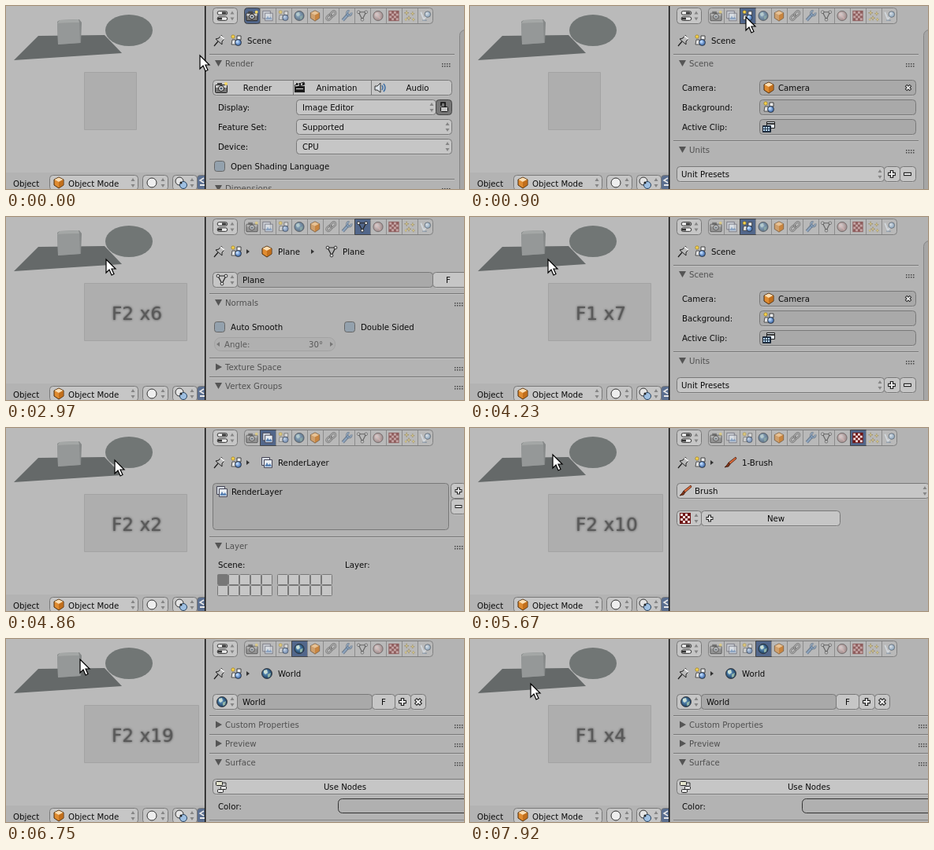
An HTML page with a canvas that plays this animation: 581 by 233 pixels, repeating every 8 s.

```html
<!DOCTYPE html>
<html lang="en">
<head>
<meta charset="utf-8">
<title>Properties tabs</title>
<style>
html, body { margin: 0; width: 100%; height: 100%; overflow: hidden; background: #b3b3b3; }
canvas { display: block; }
</style>
</head>
<body>
<canvas id="stage" width="581" height="233"></canvas>
<script>
const c = document.getElementById('stage').getContext('2d');
const LOOP = 8000, TICK = 90, FONT = '"DejaVu Sans", sans-serif';
const TABS = ['camera', 'layers', 'scene', 'world', 'cube', 'chain',
  'wrench', 'mesh', 'material', 'checker', 'spark', 'physics'];

// ---------- basic shapes ----------
function poly(pts, fill, stroke, w = 1) {
  c.beginPath();
  for (let i = 0; i < pts.length; i += 2) c.lineTo(pts[i], pts[i + 1]);
  if (fill) { c.closePath(); c.fillStyle = fill; c.fill(); }
  if (stroke) { c.strokeStyle = stroke; c.lineWidth = w; c.stroke(); }
}
function disc(x, y, r, fill, stroke, w = 1) {
  c.beginPath();
  c.arc(x, y, r, 0, 7);
  if (fill) { c.fillStyle = fill; c.fill(); }
  if (stroke) { c.strokeStyle = stroke; c.lineWidth = w; c.stroke(); }
}
function rect(x, y, w, h, fill) {
  c.fillStyle = fill;
  c.fillRect(x, y, w, h);
}
function box(x, y, w, h, fill, r = 4, stroke = '#787878') {
  c.beginPath();
  c.roundRect(x + .5, y + .5, w - 1, h - 1, r);
  c.fillStyle = fill;
  c.fill();
  c.strokeStyle = stroke;
  c.lineWidth = 1;
  c.stroke();
}
function text(s, x, y, color = '#0c0c0c', align = 'left') {
  c.font = '10.2px ' + FONT;
  c.textAlign = align;
  c.fillStyle = color;
  c.fillText(s, x, y + 4);
}
function ball(x, y, r, light, dark) {
  const g = c.createRadialGradient(x - r / 3, y - r / 3, 1, x, y, r);
  g.addColorStop(0, light);
  g.addColorStop(1, dark);
  disc(x, y, r, g, '#333', .8);
}

// ---------- icons, drawn around 0,0 ----------
const ICONS = {
  camera() {
    box(-8, -4, 16, 11, '#777', 1, '#222');
    rect(-7, -3, 14, 3, '#ccc');
    rect(-5, -6, 6, 3, '#444');
    disc(0, 1, 3.5, '#ddd', '#111');
    disc(0, 1, 1.6, '#456');
    disc(6, -5, 2, '#f5d765');
  },
  layers() {
    box(-7, -7, 11, 11, '#d7dde5', 0, '#445');
    box(-4, -4, 11, 11, '#e8edf2', 0, '#445');
    poly([-3, 5, 0, 0, 2, 3, 4, 1, 6, 5], '#5b83b4');
  },
  scene() {
    poly([-5, -1, -1, -1, 0, 5, -6, 5], '#e6e6e6', '#333', .8);
    poly([1, -6, 6, -6, 6, -1, 1, -1], '#eee', '#333', .9);
    ball(2.5, 2.5, 4, '#b9d8ff', '#2c5a9c');
    disc(-4, -5, 2.2, '#f5d24e', '#8a6d18', .6);
  },
  world() {
    ball(0, 0, 6.5, '#6fa6d2', '#173a5e');
    poly([-4, -4, 0, -5, 1, -1, -2, 1, -4, -1], '#e2efd8cc');
    poly([1, 1, 5, -1, 4, 4, 1, 5], '#a9cbb0cc');
  },
  cube() {
    poly([0, -7, 6, -4, 6, 3, 0, 7, -6, 3, -6, -4], '#e08c31', '#4b2b0b');
    poly([0, -6.5, 5.5, -4, 0, -1, -5.5, -4], '#fbdfb6');
    poly([0, -1, 5.5, -4, 5.5, 3, 0, 6.3], '#c26f1c');
  },
  chain() {
    c.save();
    c.rotate(-.75);
    for (const x of [-7, 0]) {
      c.beginPath();
      c.roundRect(x, -2.5, 8, 5, 2.5);
      c.strokeStyle = '#444'; c.lineWidth = 2.6; c.stroke();
      c.strokeStyle = '#ddd'; c.lineWidth = 1.1; c.stroke();
    }
    c.restore();
  },
  wrench() {
    poly([-5, 6, 3, -3], null, '#28415e', 4.2);
    poly([-5, 6, 3, -3], null, '#a9c9ea', 2.4);
    c.beginPath();
    c.arc(3.5, -3.5, 3, -.2, 4.8);
    c.strokeStyle = '#28415e'; c.lineWidth = 2.8; c.stroke();
    c.strokeStyle = '#c1d9f0'; c.lineWidth = 1.4; c.stroke();
  },
  mesh() {
    poly([-5, -5, 5, -5, 0, 5, -5, -5], null, '#222', 1.2);
    for (const [x, y] of [[-5, -5], [5, -5], [0, 5]]) disc(x, y, 1.9, '#eee', '#222', .9);
  },
  material() {
    ball(0, 0, 6.5, '#eadfdf', '#8b6262');
    poly([-4, -4, 3, 4], null, '#d9b4b4', 2);
  },
  checker() {
    rect(-7, -7, 14, 14, '#6e1515');
    for (let i = 0; i < 16; i++)
      if ((i + (i >> 2)) % 2 == 0) rect(-6 + i % 4 * 3, -6 + (i >> 2) * 3, 3, 3, '#f3dede');
  },
  spark() {
    for (const [x, y, r] of [[-4, -4, 3], [4, -3, 2.5], [-1, 3, 3], [5, 5, 2], [-5, 5, 1.5]]) {
      poly([x - r, y, x + r, y], null, '#8b7430', 1.4);
      poly([x, y - r, x, y + r], null, '#8b7430', 1.4);
      disc(x, y, 1.2, '#fff0a8');
    }
  },
  physics() {
    poly([-6, -5, -2, 5, 1, 0], null, '#e8f1fa', 2);
    ball(3, -2, 4, '#e2f1ff', '#608fbc');
    poly([-4, 6, 2, 6], null, '#5f7890', 1.4);
  },
  brush() {
    poly([6, -7, 7, -5, -1, 2, -3, 0], '#dc6a3a', '#4a2010', .8);
    poly([-3, 0, -1, 2, -3, 5, -8, 6, -5, 3], '#7d3318', '#401c10', .8);
  },
  clip() {
    box(-3, -7, 11, 9, '#e4ebf2', 0, '#222');
    rect(-2, -5, 9, 2, '#333');
    box(-8, -2, 11, 9, '#24364d', 0, '#16222f');
    for (let i = 0; i < 6; i++) rect(-7 + i % 3 * 3, (i / 3 | 0) * 3, 2, 2, '#b8d8f2');
  },
  slate() {
    rect(-7, -2, 13, 8, '#1d1d1d');
    poly([-7, -3, 5, -7, 6, -4, -6, -1], '#eee', '#222');
    for (const x of [-4, 0, 4]) rect(x - 1, -6, 2, 3, '#222');
    rect(-5, 1, 9, 1, '#ddd');
  },
  speaker() {
    poly([-6, -2, -3, -2, 1, -6, 1, 6, -3, 3, -6, 3], '#dce2e8', '#333');
    for (const r of [4, 7]) {
      c.beginPath(); c.arc(0, 0, r, -.8, .8);
      c.strokeStyle = '#3c6ea5'; c.lineWidth = 1.5; c.stroke();
    }
  },
  nodes() {
    box(-7, -7, 9, 6, '#e6e6cf', 1, '#222');
    box(-1, -1, 8, 5, '#e6e6e6', 1, '#222');
    box(-5, 3, 8, 5, '#e6e6e6', 1, '#222');
    poly([2, -5, 6, -5, 6, -1], null, '#333');
  },
  pin() {
    poly([-7, 7, -2, 1], null, '#222', 1.3);
    poly([-5, -2, 3, 5, 3, 1, 6, -2, 2, -7, -1, -3], '#bbb', '#222');
    poly([1, -6, 6, -2], null, '#eee', 2);
  },
  lock() {
    box(-5, -1, 10, 7, '#c5c5c5', 1, '#111');
    poly([-4, -2, -4, -6, 1, -6, 1, -1], null, '#111', 1.6);
  },
  props() {
    for (const [y, x] of [[-7, 0], [1, -6]]) {
      box(-7, y, 15, 6, '#eee', 3, '#222');
      rect(x, y + 1.5, 6, 3, '#333');
    }
  },
  plus() {
    poly([-5, 0, 5, 0], null, '#222', 4.4); poly([0, -5, 0, 5], null, '#222', 4.4);
    poly([-4, 0, 4, 0], null, '#eee', 2); poly([0, -4, 0, 4], null, '#eee', 2);
  },
  minus() {
    poly([-5, 0, 5, 0], null, '#222', 4.4);
    poly([-4, 0, 4, 0], null, '#eee', 2);
  },
  cross() {
    c.save(); c.rotate(Math.PI / 4); ICONS.plus(); c.restore();
  }
};
function icon(name, x, y, k = 1) {
  c.save();
  c.translate(x, y);
  c.scale(k, k);
  ICONS[name]();
  c.restore();
}

// ---------- widgets ----------
const LIGHT = '#c6c6c6', SUNK = '#a9a9a9';
function updown(x, y) {
  poly([x - 2.5, y - 2, x + 2.5, y - 2, x, y - 6], '#858585');
  poly([x - 2.5, y + 2, x + 2.5, y + 2, x, y + 6], '#858585');
}
// A row-high widget with a faint light rim below it.
function row(x, y, w, fill) {
  const top = Math.floor(y - 9.5);
  rect(x + 4, top + 20, w - 8, 1, '#c0c0c0');
  box(x, top, w, 20, fill);
}
function button(x, y, w, label, mid = x + w / 2) {
  row(x, y, w, LIGHT);
  if (label) text(label, mid, y, undefined, 'center');
}
function menu(x, y, w, label, dx = 8) {
  button(x, y, w);
  text(label, x + dx, y);
  updown(x + w - 6, y);
}
function field(x, y, w, label = '', dx = 24) {
  row(x, y, w, SUNK);
  text(label, x + dx, y);
}
function check(x, y, label) {
  box(x, y - 7, 14, 14, '#93a1ad', 3, '#666');
  text(label, x + 21, y);
}
function panel(y, label, open = true, right = 569) {
  rect(258, y - 12, right - 258, 1, '#777');
  rect(258, y - 11, right - 258, 1, '#c3c3c3');
  poly(open ? [265, y - 4, 274, y - 4, 269.5, y + 4] : [266, y - 4.5, 274, y, 266, y + 4.5], '#555');
  text(label, 278, y, '#505050');
  for (let i = 0; i < 8; i++) rect(right - 16 + (i % 4) * 3, y + (i > 3 ? 3 : 0), 1.5, 1.5, '#444');
}
function crumbs(...items) {
  icon('pin', 271, 44);
  icon('scene', 292, 44);
  if (!items.length) return text('Scene', 306, 44);
  let x = 331;
  for (const [name, label] of items) {
    poly([x - 26, 41, x - 22, 44, x - 26, 47], '#333');
    icon(name, x, 44);
    text(label, x + 14, 44);
    x += 82;
  }
}
function nameRow(name, label, w) {
  button(262, 80, 32);
  icon(name, 274, 80);
  updown(287, 80);
  field(293, 80, w, label, 7);
  button(292 + w, 80, w > 200 ? 60 : 30, 'F', w > 200 ? 561 : 479);
}
function scrollbar() {
  box(575, 30, 20, 230, '#a6a6a6', 7, '#858585');
}
function slots() {
  box(262, 70, 300, 60, SUNK);
  for (const [name, y] of [['plus', 80], ['minus', 100]]) {
    button(564, y, 20);
    icon(name, 574, y, .9);
  }
}

// ---------- one page per tab ----------
const plane = ['cube', 'Plane'];
const PAGES = {
  camera() {
    scrollbar(); crumbs(); panel(73, 'Render');
    button(262, 104, 304);
    rect(364, 95, 1, 18, '#787878'); rect(463, 95, 1, 18, '#787878');
    icon('camera', 273, 104); icon('slate', 373, 104); icon('speaker', 474, 104);
    text('Render', 319, 104, '#0c0c0c', 'center');
    text('Animation', 419.5, 104, '#0c0c0c', 'center');
    text('Audio', 522, 104, '#0c0c0c', 'center');
    [['Display:', 'Image Editor', 178], ['Feature Set:', 'Supported', 198], ['Device:', 'CPU', 198]]
      .forEach(([a, b, w], i) => { text(a, 269, 129 + i * 25); menu(368, 129 + i * 25, w, b); });
    box(545, 119, 21, 20, '#777', 4, '#444');
    icon('lock', 556, 129);
    check(264, 204, 'Open Shading Language');
    panel(232, 'Dimensions');
  },
  layers() {
    crumbs(['layers', 'RenderLayer']);
    slots();
    icon('layers', 274, 81); text('RenderLayer', 286, 81);
    panel(150, 'Layer', true, 585);
    text('Scene:', 269, 174); text('Layer:', 430, 174);
    for (let i = 0; i < 20; i++)
      box(268 + i % 10 * 14 + (i % 10 > 4 ? 6 : 0), 186 + (i > 9 ? 14 : 0), 14, 14, i ? LIGHT : '#777', 1);
  },
  scene() {
    scrollbar(); crumbs(); panel(73, 'Scene');
    [['Camera:', 'Camera', 'cube'], ['Background:', '', 'scene'], ['Active Clip:', '', 'clip']]
      .forEach(([a, b, name], i) => {
        const y = 104 + i * 25;
        text(a, 269, y); field(367, y, 199, b); icon(name, 379, y);
      });
    icon('cross', 556, 104, .85);
    panel(183, 'Units');
    menu(262, 214, 264, 'Unit Presets', 6);
    button(525, 214, 21); icon('plus', 535, 214);
    button(545, 214, 21); icon('minus', 555, 214);
  },
  world() {
    crumbs(['world', 'World']);
    nameRow('world', 'World', 172);
    button(493, 80, 21); icon('plus', 503, 80);
    button(513, 80, 20); icon('cross', 523, 80);
    panel(109, 'Custom Properties', false, 585);
    panel(133, 'Preview', false, 585);
    panel(157, 'Surface', true, 585);
    button(262, 188, 336, 'Use Nodes');
    icon('nodes', 273, 188);
    text('Color:', 269, 213);
    box(421, 203, 180, 19, '#b0b0b0', 5, '#333');
    rect(258, 230, 323, 1, '#858585');
  },
  cube() {
    crumbs(plane);
    nameRow('cube', 'Plane', 249);
    panel(109, 'Transform', true, 585);
    ['Location:', 'Rotation:', 'Scale:'].forEach((s, i) => {
      const x = 264 + i * 108;
      text(s, x + 4, 133);
      for (let j = 0; j < 3; j++) {
        field(x, 153 + j * 20, 104, 'XYZ'[j] + ':', 14);
        text(i == 1 ? '0°' : i ? '1.000' : '0.000', x + 92, 153 + j * 20, '#111', 'right');
      }
    });
    panel(226, 'Delta Transform', false, 585);
  },
  chain() {
    crumbs(plane);
    menu(262, 80, 320, 'Add Object Constraint');
  },
  wrench() {
    crumbs(plane);
    menu(262, 80, 320, 'Add Modifier');
  },
  mesh() {
    crumbs(plane, ['mesh', 'Plane']);
    nameRow('mesh', 'Plane', 249);
    panel(109, 'Normals', true, 585);
    check(264, 140, 'Auto Smooth');
    check(429, 140, 'Double Sided');
    box(264, 153, 154, 18, '#b0b0b0', 8, '#a3a3a3');
    text('Angle:', 277, 162, '#595959');
    text('30°', 402, 162, '#595959', 'right');
    poly([271, 159, 267, 162, 271, 165], '#777');
    poly([411, 159, 415, 162, 411, 165], '#777');
    panel(191, 'Texture Space', false, 585);
    panel(215, 'Vertex Groups', true, 585);
  },
  material() {
    crumbs(plane);
    slots();
    button(262, 147, 32); icon('material', 274, 147); updown(287, 147);
    button(293, 147, 270, 'New'); icon('plus', 304, 147);
  },
  checker() {
    crumbs(['brush', '1-Brush']);
    menu(262, 80, 321, 'Brush', 23);
    icon('brush', 274, 80);
    button(262, 115, 32); icon('checker', 273, 115); updown(287, 115);
    button(293, 115, 177, 'New', 388); icon('plus', 304, 115, .9);
  },
  spark() {
    crumbs(plane);
    slots();
    button(262, 147, 300, 'New'); icon('plus', 273, 147);
  },
  physics() {
    crumbs(plane);
    text('Enable physics for:', 264, 73);
    ['Force Field', 'Collision', 'Cloth', 'Dynamic Paint', 'Soft Body', 'Fluid', 'Smoke', 'Rigid Body']
      .forEach((s, i) => button(i < 4 ? 262 : 424, 94 + i % 4 * 22, 158, s));
  }
};

// ---------- viewport ----------
function viewport() {
  rect(0, 0, 252, 233, '#bababa');
  poly([41, 38, 125, 37, 147, 60, 10, 69], '#656969');
  poly([65, 20, 68, 18, 93, 17, 96, 21, 95, 47, 66, 49], '#868989');
  poly([65, 22, 93, 21, 94, 47, 66, 49], '#959898');
  poly([65, 22, 68, 18, 92, 17, 93, 21], '#a4a7a6');
  c.beginPath();
  c.ellipse(156, 31, 30, 20, 0, 0, 7);
  c.fillStyle = '#717675';
  c.fill();

  rect(0, 212, 252, 21, '#b3b3b3');
  text('Object', 9, 226);
  button(55, 225, 113); icon('cube', 67, 225); text('Object Mode', 79, 226); updown(161, 225);
  button(173, 225, 33); disc(185, 225, 6, '#eee', '#333'); updown(199, 225);
  button(211, 225, 32);
  disc(220, 223, 5, '#e5e5e5', '#333'); disc(225, 228, 4.5, '#9fc0e2', '#27425f');
  disc(222, 225, 1.5, '#222'); updown(236, 225);
  box(242, 215, 20, 20, '#5b6f90');
  poly([251, 219, 246, 222, 251, 225], null, '#e8e8e8', 1.5);
  poly([246, 228, 252, 228], null, '#e8e8e8', 2);
}
function keyBox(label) {
  c.font = '23.2px ' + FONT;
  c.textAlign = 'left';
  const w = label ? c.measureText(label).width : 0;
  box(99, 84, Math.round(w + 67), 74, '#aeaeae', 0, '#a3a3a3');
  if (!label) return;
  c.save();
  c.shadowColor = '#444';
  c.shadowBlur = 3;
  c.fillStyle = '#5a5a5a';
  c.fillText(label, 134, 131);
  c.restore();
}
function header(tab) {
  box(262, 2, 32, 21, LIGHT);
  icon('props', 274, 12.5, .9);
  updown(287, 12.5);
  box(302, 2, 240, 21, '#b9b9b9', 4, '#808080');
  TABS.forEach((name, i) => {
    const x = 302 + i * 20;
    if (i == tab) box(x, 2, 21, 21, '#52678b', i ? 0 : 4, '#444');
    else if (i) rect(x, 3, 1, 19, '#8c8c8c');
    c.globalAlpha = i == tab ? 1 : .55;
    icon(name, x + 10, 12.5, .95);
    c.globalAlpha = 1;
  });
}

// ---------- timeline ----------
// start, interval, key, presses, direction, first tab, presses already counted
const RUNS = [
  [1980, 198, 'F2', 8, 1, 1, 0],
  [3510, 120, 'F1', 10, -1, 9, 0],
  [4680, 110, 'F2', 10, 1, 11, 0],
  [5790, 120, 'F2', 13, 1, 9, 10],
  [7410, 160, 'F1', 4, -1, 7, 0]
];
function stateAt(t) {
  let tab = t < 540 ? 0 : t < 720 ? 1 : t < 1350 ? 2 : 1, label = '';
  for (const [start, gap, key, n, dir, from, base] of RUNS) {
    if (t < start) break;
    const k = Math.min(n, Math.floor((t - start) / gap) + 1);
    const moved = base ? Math.min(k, Math.max(2, k - 3)) : k;
    tab = (from + dir * moved + 12) % 12;
    label = key + (k + base > 1 ? ' x' + (k + base) : '');
  }
  return { tab, label };
}
const PATH = [
  [0, 246, 63], [450, 312, 16], [810, 350, 14], [1170, 350, 14], [1350, 331, 14],
  [1530, 312, 18], [2070, 127, 54], [2970, 127, 54], [3690, 120, 52], [4050, 84, 50],
  [4230, 99, 54], [4500, 122, 50], [4950, 140, 40], [5310, 118, 36], [5490, 76, 36],
  [5670, 105, 34], [6120, 84, 32], [6390, 68, 30], [6750, 94, 26], [6930, 128, 36],
  [7290, 148, 45], [7740, 128, 54], [7920, 77, 57]
];
function pointerAt(t) {
  const i = PATH.findIndex(p => p[0] > t);
  if (i < 0) return PATH[PATH.length - 1].slice(1);
  const [a, b] = [PATH[i - 1], PATH[i]];
  let u = (t - a[0]) / (b[0] - a[0]);
  u = u * u * (3 - 2 * u);
  return [a[1] + (b[1] - a[1]) * u, a[2] + (b[2] - a[2]) * u];
}
function pointer(x, y) {
  c.save();
  c.translate(Math.round(x), Math.round(y));
  poly([0, 0, 0, 17, 4, 13, 7, 20, 10, 18.5, 7, 12, 12, 12, 0, 0], '#fff', '#000', 1.2);
  c.restore();
}
function draw(time) {
  const t = Math.floor(time % LOOP / TICK) * TICK;
  const { tab, label } = stateAt(t);
  viewport();
  keyBox(label);
  rect(252, 0, 329, 233, '#b3b3b3');
  rect(252, 0, 1.5, 233, '#111');
  header(tab);
  PAGES[TABS[tab]]();
  pointer(...pointerAt(t));
}

const begin = performance.now();
function loop() {
  draw(performance.now() - begin);
  requestAnimationFrame(loop);
}
loop();
</script>
</body>
</html>
```
